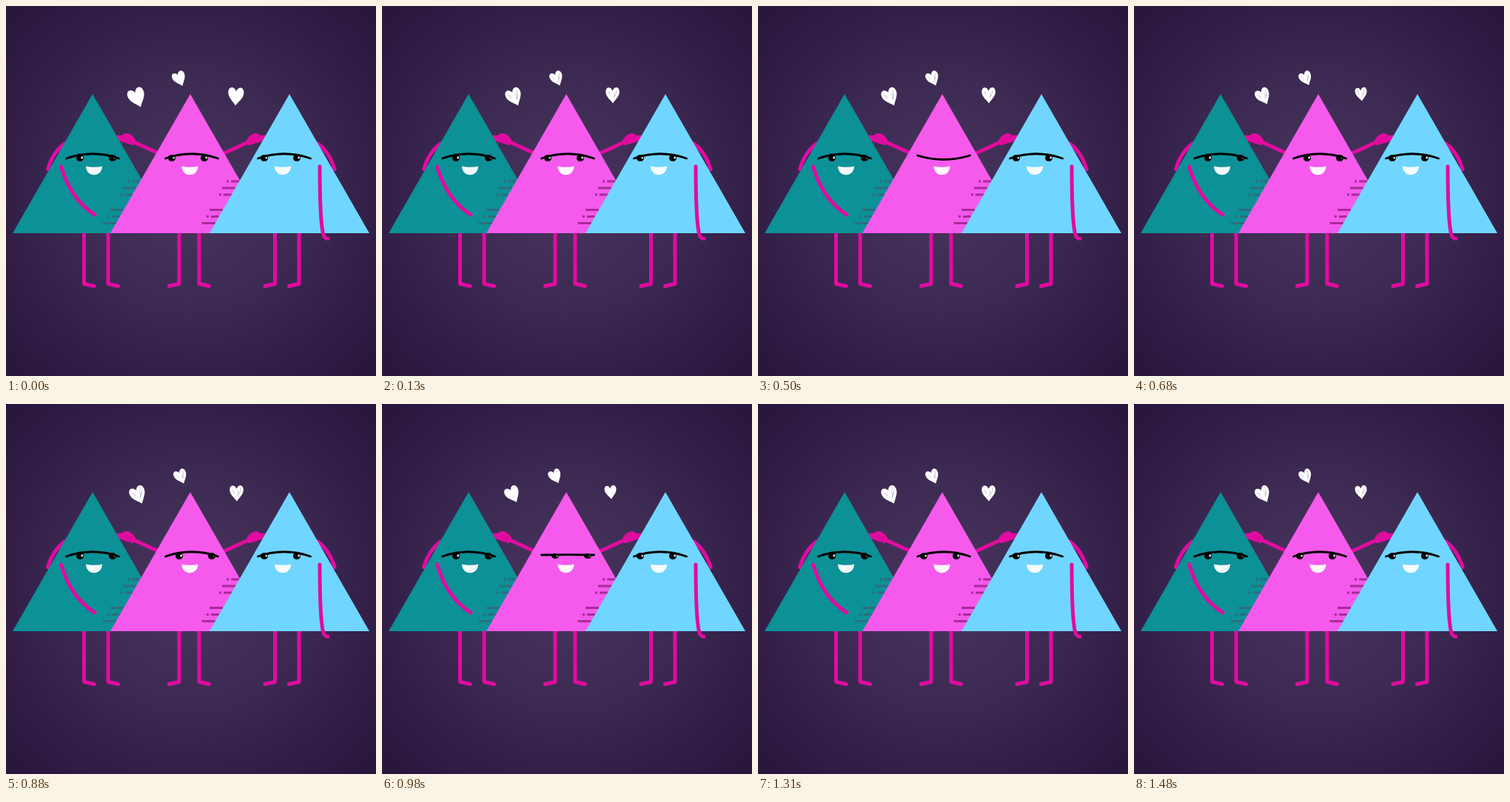
An HTML page for the animation above (1.58 s loop, 500 px wide and 500 px high).

```html
<!DOCTYPE html>
<html lang="en">
<head>
<meta charset="utf-8">
<title>Triangle friends</title>
<style>
  html, body { margin: 0; width: 100%; height: 100%; overflow: hidden; background: #29163d; }
  svg { display: block; width: 100%; height: 100%; }
  .limb { fill: none; stroke: #e00ca0; stroke-width: 5; stroke-linecap: round; stroke-linejoin: round; }
  .lid { fill: none; stroke: #000; stroke-width: 2.8; stroke-linecap: round; }
  .streak { fill: none; stroke-width: 3; }
  .scribble { fill: none; stroke: #8d829b; stroke-width: .04; stroke-linecap: round; }
</style>
</head>
<body>
<svg viewBox="0 0 500 500">
  <defs>
    <radialGradient id="night" gradientUnits="userSpaceOnUse" cx="250" cy="250" r="345">
      <stop offset="0" stop-color="#48355d"/>
      <stop offset=".45" stop-color="#3d2a53"/>
      <stop offset=".75" stop-color="#311d46"/>
      <stop offset="1" stop-color="#29163d"/>
    </radialGradient>
    <g id="reach">
      <path class="limb" d="M206 199L172 183.500"/>
      <path fill="#e00ca0" d="M147 175C153 174 156 176 159 173C165 170 172 175 175 181C177 188 172 189 168 187C160 185 155 182 147 181Z"/>
      <path class="limb" stroke-width="6" d="M79 186Q63 198 56.500 220.500"/>
    </g>
  </defs>
  <rect width="500" height="500" fill="url(#night)"/>
  <g id="legs"></g>
  <use href="#reach"/>
  <use href="#reach" transform="matrix(-1 0 0 1 500.500 0)"/>
  <g id="bodies"></g>
  <path class="limb" d="M74.500 217Q88 262 120 282"/>
  <path class="limb" d="M424 217C424 255 424.500 290 428.500 308Q430 314 435 314.500"/>
  <g id="faces"></g>
  <g id="hearts"></g>
</svg>
<script>
const LOOP = 1580;
const TOP = 119, BASE = 307, HALF = 108;
const NS = 'http://www.w3.org/2000/svg';
const [legs, bodies, faces, heartLayer] =
  ['legs', 'bodies', 'faces', 'hearts'].map(id => document.getElementById(id));

function add(parent, tag, attrs = {}) {
  const el = document.createElementNS(NS, tag);
  for (const key in attrs) el.setAttribute(key, attrs[key]);
  return parent.appendChild(el);
}

// hips: leg x; feet: foot directions; brow: left end of the lid
const friends = [
  { apex: 117, color: '#0c9196', hips: [105.5, 138], feet: [1, 1], brow: 81, mouth: 119, look: 19 },
  { apex: 249, color: '#f55aec', hips: [234, 261], feet: [-1, 1], brow: 215, mouth: 248.5, look: 9 },
  { apex: 383, color: '#70d6ff', hips: [363.5, 396], feet: [-1, -1], brow: 340, mouth: 374, look: 9 }
];

function addLegs({ hips, feet }) {
  hips.forEach((x, i) =>
    add(legs, 'path', { class: 'limb', d: `M${x} 306V375.5L${x + feet[i] * 13.5} 378.5` }));
}

function addBody({ apex, color }) {
  add(bodies, 'path', { fill: color, d: `M${apex} ${TOP}L${apex + HALF} ${BASE}H${apex - HALF}Z` });
}

// shade streaks that end at the left edge of the triangle in front
function addStreaks(apex, color) {
  let d = '';
  for (let i = 0; i < 6; i++) {
    const y = 237 + 38.5 * Math.floor(i / 3) + 9 * (i % 3);
    const edge = apex - HALF * (y - TOP) / (BASE - TOP);
    d += i % 2 ? `M${edge - 18} ${y}h18` : `M${edge - 17} ${y}h3m3 0h11`;
  }
  add(bodies, 'path', { class: 'streak', stroke: color, d });
}

function addFace({ brow, mouth }) {
  const face = add(faces, 'g', { transform: `translate(${brow} 0)` });
  const eyes = add(face, 'g');
  for (const x of [0, 44]) {
    add(eyes, 'ellipse', { cx: x, cy: 205.5, rx: 5, ry: 4.6 });
    add(eyes, 'circle', { cx: x + 2.7, cy: 205, r: 1.4, fill: '#fff' });
  }
  const lid = add(face, 'path', { class: 'lid' });
  add(face, 'path', {
    fill: '#fff', opacity: 0.95,
    d: `M${mouth - brow - 11} 216.5q11 2.5 22 0c0 15.5 -22 15.5 -22 0Z`
  });
  return { eyes, lid };
}

// shut: 0 open, 1 closed; look: x offset of the pupils
function poseFace({ eyes, lid }, shut, look) {
  const end = 206 - 4 * shut;
  const squash = 1 - 0.5 * shut;
  lid.setAttribute('d', `M0.5 ${end}Q36 ${193.5 + 19.5 * shut} 71.5 ${end}`);
  eyes.setAttribute('visibility', shut < 0.85 ? 'visible' : 'hidden');
  eyes.setAttribute('transform', `translate(${look} ${205.5 * (1 - squash)}) scale(1 ${squash})`);
}

friends.forEach(addLegs);
addBody(friends[0]);
addStreaks(friends[1].apex, '#2b6f80');
addBody(friends[1]);
addStreaks(friends[2].apex, '#a82a98');
addBody(friends[2]);
const [teal, pink, blue] = friends.map(addFace);
poseFace(teal, 0, friends[0].look);
poseFace(blue, 0, friends[2].look);

// unit heart, tip at the origin
const HEART = 'M0 0C-.16-.24-.43-.42-.43-.72C-.43-1.06-.1-1.08 0-.78C.1-1.08.43-1.06.43-.72C.43-.42.16-.24 0 0Z';
const SCRIBBLE = 'M-.25-.75L-.16-.52M.24-.8Q.3-.6.1-.4M.1-.68Q.2-.6.04-.34';

const hearts = [
  { x: 182, y: 136.5, size: 26.5, tilt: -21, rise: 4 },
  { x: 238.5, y: 108, size: 20.5, tilt: -23, rise: 1 },
  { x: 310, y: 134.5, size: 24.5, tilt: 3, rise: 6 }
];
for (const h of hearts) {
  h.g = add(heartLayer, 'g');
  add(h.g, 'path', { d: HEART, fill: '#fff' });
  h.lines = add(h.g, 'path', { d: SCRIBBLE, class: 'scribble' });
}

// four drawings per cycle: hearts rise and shrink while they sway
function poseHearts(step) {
  const phase = step % 4;
  const up = Math.min(1, phase / 2);
  const sway = 2 * Math.sin(phase * Math.PI / 2);
  for (const h of hearts) {
    const lift = h.rise * up;
    h.g.setAttribute('transform',
      `translate(${h.x + sway} ${h.y - lift}) rotate(${h.tilt - 1.5 * lift}) scale(${h.size - lift})`);
    h.lines.setAttribute('opacity', phase % 2 ? 0.5 : 0);
  }
}

// lid position around the moment mid, redrawn every hold ms
function blink(t, mid, closing, opening, hold) {
  const d = Math.floor((t - mid) / hold) * hold;
  return Math.max(0, 1 - (d < 0 ? -d / closing : d / opening));
}

function draw(t) {
  poseHearts(Math.floor((t < 400 ? t : t + 20) / 100));
  const shut = Math.max(blink(t, 500, 100, 180, 30), blink(t, 1010, 200, 200, 100));
  poseFace(pink, shut, t >= 500 && t < 1010 ? 19 : 9);
}

const start = performance.now();
function tick() {
  draw((performance.now() - start) % LOOP);
  requestAnimationFrame(tick);
}
draw(0);
requestAnimationFrame(tick);
</script>
</body>
</html>
```
